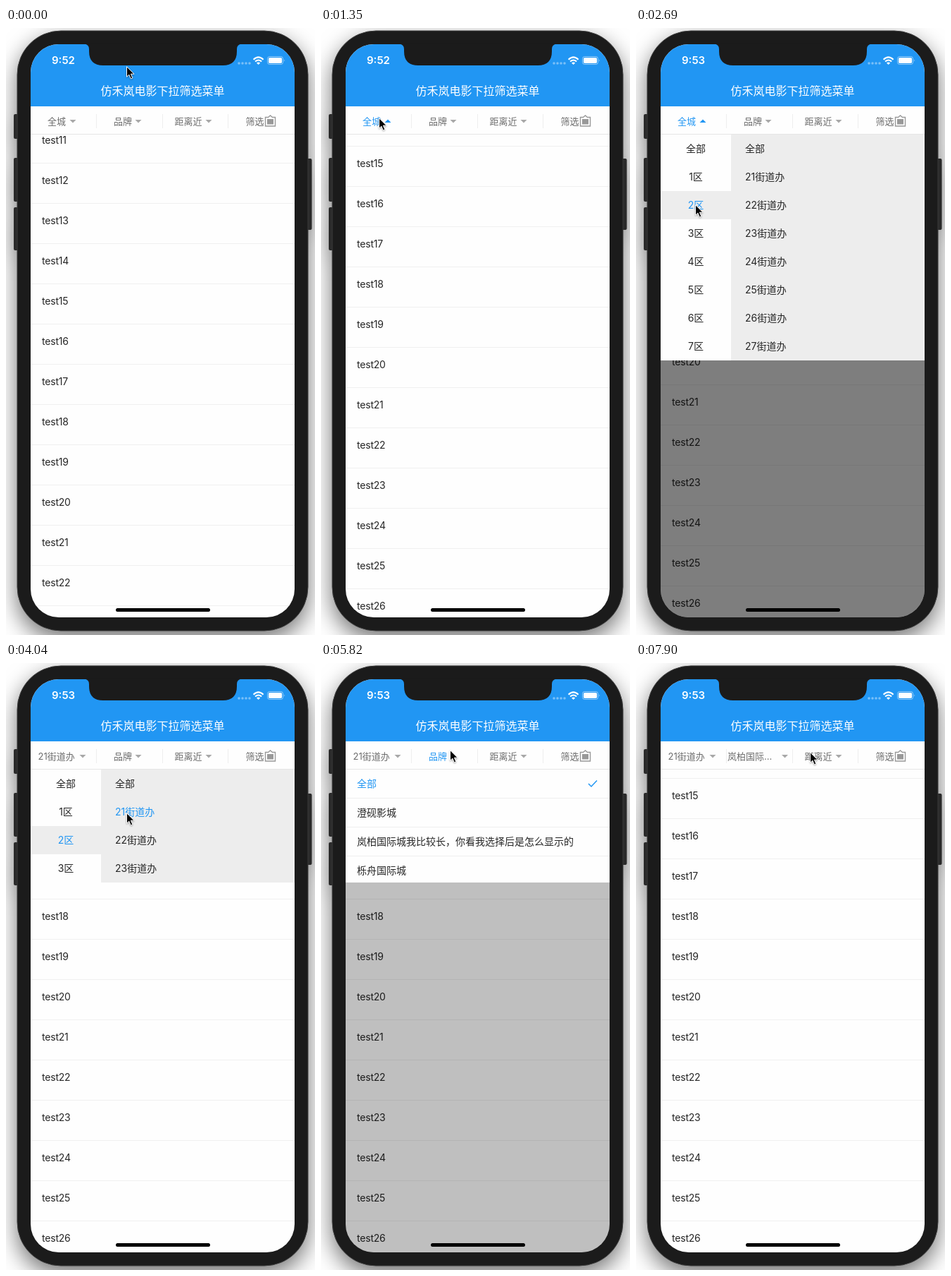
An HTML page for the animation above (8 s loop, 439 by 860 pixels).

```html
<!DOCTYPE html>
<html lang="zh-CN">
<head>
<meta charset="utf-8">
<title>下拉筛选菜单</title>
<style>
  html, body { margin: 0; width: 100%; height: 100%; overflow: hidden; background: #fff; }
  svg { display: block; width: 439px; height: 860px; }
  text { font-family: Inter, "Noto Sans CJK SC", "Noto Sans CJK", sans-serif; white-space: pre; }
  .body { filter: drop-shadow(0 12px 16px rgba(0, 0, 0, .55)); }
</style>
</head>
<body>
<svg id="stage" viewBox="0 0 439 860">
  <defs>
    <clipPath id="screen"><rect x="35" y="23" width="375" height="812" rx="40"/></clipPath>
    <clipPath id="listArea"><rect x="35" y="151" width="375" height="684"/></clipPath>
    <clipPath id="menuArea"><rect id="menuClip" x="35" y="151" width="375" height="0"/></clipPath>
  </defs>

  <g class="body" fill="#2a2a2a">
    <rect x="11" y="122" width="9" height="35" rx="2"/>
    <rect x="11" y="184" width="9" height="62" rx="2"/>
    <rect x="11" y="254" width="9" height="61" rx="2"/>
    <rect x="425" y="185" width="9.5" height="101" rx="2"/>
    <rect x="16" y="4" width="413" height="850" rx="62" fill="#1b1b1b" stroke="#3c3c3c"/>
  </g>

  <g clip-path="url(#screen)">
    <rect x="35" y="23" width="375" height="812" fill="#fefefe"/>
    <g clip-path="url(#listArea)"><g id="list"></g></g>
    <rect id="mask" x="35" y="151" width="375" height="684"/>
    <g clip-path="url(#menuArea)">
      <g id="areaMenu"></g>
      <g id="brandMenu"></g>
    </g>
    <rect x="35" y="23" width="375" height="88" fill="#2196f3"/>
    <g id="bar"></g>
    <g id="status" fill="#fff">
      <rect x="371.5" y="40.5" width="22" height="11" rx="3" fill="none" stroke="#fff" stroke-opacity=".5"/>
      <rect x="373" y="42" width="19" height="8" rx="1.8"/>
      <path d="M395 44.2q1.6 1.8 0 3.6z" fill-opacity=".6"/>
      <g fill="none" stroke="#fff" stroke-width="2.1">
        <path d="M351.6 44.8q7-6.8 14 0M354.1 47.6q4.5-4.2 9 0"/>
      </g>
      <path d="M356 49.4q2.6-2 5.2 0L358.600 52z"/>
    </g>
    <rect x="156" y="822" width="134" height="5" rx="2.5"/>
  </g>
  <path d="M111 22.500Q118 23 118 30V33Q118 53 138 53H308Q328 53 328 33V30Q328 23 335 22.500Z" fill="#1b1b1b"/>

  <path id="cursor" d="M.5 .7V15.200L3.800 12.100 6.300 17.900 8.800 16.800 6.400 11.200H11Z"
        stroke="#fff" stroke-width="1" style="filter:drop-shadow(0 1px 1px rgba(0,0,0,.35))"/>
</svg>

<script>
const LOOP = 8000, TICK = 149;
const BLUE = '#2196f3', INK = '#262626', GREY = '#6c6c6c', PANEL = '#ededed', LINE = '#eee';
const $ = id => document.getElementById(id);

function add(parent, tag, attrs) {
  const el = document.createElementNS('http://www.w3.org/2000/svg', tag);
  for (const k in attrs) el.setAttribute(k, attrs[k]);
  return parent.appendChild(el);
}
const rect = (p, x, y, width, height, fill) => add(p, 'rect', { x, y, width, height, fill });
function label(p, str, x, cy, size = 14, fill = INK, more = {}) {
  const el = add(p, 'text', { x, y: cy + size * .36, 'font-size': size, fill, ...more });
  el.textContent = str;
  return el;
}
const show = (el, on) => el.setAttribute('visibility', on ? 'visible' : 'hidden');

// Status bar and title
const clock = label($('status'), '9:52', 65, 46, 15, '#fff', { 'font-weight': 600 });
for (let i = 0; i < 4; i++) add($('status'), 'circle', { cx: 331 + i * 5, cy: 50, r: 1.8, 'fill-opacity': .4 });
label($('status'), '仿禾岚电影下拉筛选菜单', 222.500, 89, 16, '#fff', { 'text-anchor': 'middle' });

// Scrolling list
for (let n = 10; n < 28; n++) {
  const y = 216 + (n - 12) * 57;
  rect($('list'), 35, y - 25, 375, 1, '#f0f0f0');
  label($('list'), 'test' + n, 51, y, 14, INK, { 'letter-spacing': -.2 });
}

// Filter bar
const bar = $('bar');
rect(bar, 35, 111, 375, 40, '#fefefe');
rect(bar, 35, 150, 375, 1, '#e6e6e6');
for (const x of [128, 222, 315]) rect(bar, x, 122, 1, 20, LINE);
const tabs = [['全城', 59, 95], ['品牌', 153, 188], ['距离近', 239.500, 288]].map(([str, x, ax]) => ({
  text: label(bar, str, x, 132, 13, GREY), arrow: add(bar, 'path', {}), str, x, ax
}));
label(bar, '筛选', 340.500, 132, 13, GREY);
add(bar, 'path', { d: 'M368.500 126.500H372.500L375.500 124 378.500 126.500H382.500V139H368.500Z', fill: 'none', stroke: '#999', 'stroke-width': 1.400 });
rect(bar, 371, 129, 9, 7.500, '#999');

function drawTab(tab, open, chosen) {
  const [str, x, ax] = chosen || [tab.str, tab.x, tab.ax];
  tab.text.textContent = str;
  tab.text.setAttribute('x', x);
  tab.text.setAttribute('fill', open ? BLUE : GREY);
  tab.arrow.setAttribute('d', open ? `M${ax - 4.500} 134h9l-4.500-4.500z` : `M${ax - 4.500} 130h9l-4.500 4.500z`);
  tab.arrow.setAttribute('fill', open ? BLUE : '#a8a8a8');
}

// Two-level area menu
const areaMenu = $('areaMenu');
rect(areaMenu, 35, 151, 100, 320, '#fefefe');
rect(areaMenu, 135, 151, 275, 320, PANEL);
const areaPick = rect(areaMenu, 35, 151, 100, 40, PANEL);
const streets = add(areaMenu, 'g', {});
const areaRows = [], streetRows = [];
for (let i = 0; i < 8; i++) {
  const y = 171 + i * 40;
  areaRows.push(label(areaMenu, i ? i + '区' : '全部', 85, y, 14, INK, { 'text-anchor': 'middle' }));
  streetRows.push(label(streets, i ? `2${i}街道办` : '全部', 155, y));
}

// Brand menu
const brandMenu = $('brandMenu');
rect(brandMenu, 35, 151, 375, 320, '#fefefe');
const brandRows = ['全部', '澄砚影城', '岚柏国际城我比较长，你看我选择后是怎么显示的', '栎舟国际城',
  '穗汀国际城', '芷砚影院', '棠汀影城', '松砚湾影城'].map((str, i) => {
  rect(brandMenu, 35, 191 + i * 41, 375, 1, LINE);
  return label(brandMenu, str, 51, 171 + i * 41);
});
const check = add(brandMenu, 'path', { d: 'M380 171l4 4 8-8.500', fill: 'none', stroke: BLUE, 'stroke-width': 1.500 });

const pick = (rows, index) => rows.forEach((row, i) => row.setAttribute('fill', i === index ? BLUE : INK));

// Pointer moves: start tick, end tick, end x, end y, optional bend point
const moves = [
  [0, 8, 82, 127], [11, 15, 82, 248], [15, 16, 84, 250], [19, 25, 171, 212],
  [30, 36, 183, 123, 140, 172], [41, 45, 191, 252, 215, 190], [48, 53, 247, 126]
];
function pointer(t) {
  let x = 171, y = 54;
  for (const [a, b, ex, ey, bx = (x + ex) / 2, by = (y + ey) / 2] of moves) {
    if (t <= a) break;
    const u = Math.min(1, (t - a) / (b - a)), k = u * u * (3 - 2 * u), q = 1 - k;
    x = q * q * x + 2 * q * k * bx + k * k * ex;
    y = q * q * y + 2 * q * k * by + k * k * ey;
  }
  return `translate(${Math.round(x)} ${Math.round(y)})`;
}

// Menus take two ticks to unfold and to fold
const AREA = { from: 9, to: 27 }, BRAND = { from: 38, to: 47 };
const within = (t, m) => t >= m.from && t < m.to;
const unfold = (t, m) => Math.max(0, Math.min(1, (t - m.from) / 2, (m.to + 1 - t) / 2));

function draw(t) {
  const scroll = Math.round(199 * (1 - Math.exp(-t / 2.304)));
  $('list').setAttribute('transform', `translate(0 ${-scroll})`);
  clock.textContent = t < 12 ? '9:52' : '9:53';

  const area = unfold(t, AREA), brand = unfold(t, BRAND);
  $('menuClip').setAttribute('height', 320 * Math.max(area, brand));
  show(areaMenu, area > 0);
  show(brandMenu, brand > 0);
  const dim = within(t, AREA) ? area : within(t, BRAND) ? brand : 0;
  $('mask').setAttribute('fill-opacity', dim / 2);

  const district = t < 18 ? 0 : 2;
  areaPick.setAttribute('y', 151 + district * 40);
  pick(areaRows, district);
  streets.setAttribute('opacity', district ? 1 : 0);
  pick(streetRows, t < AREA.to ? -1 : 1);

  const choice = t < BRAND.to ? 0 : 2;
  pick(brandRows, choice);
  check.setAttribute('transform', `translate(0 ${choice * 41})`);

  drawTab(tabs[0], within(t, AREA), t >= AREA.to && ['21街道办', 45.500, 109]);
  drawTab(tabs[1], within(t, BRAND), t >= BRAND.to && ['岚柏国际...', 130, 211.500]);
  drawTab(tabs[2], false);
  $('cursor').setAttribute('transform', pointer(t));
}

const start = performance.now();
function frame() {
  draw(Math.floor((performance.now() - start) % LOOP / TICK));
  requestAnimationFrame(frame);
}
frame();
</script>
</body>
</html>
```
